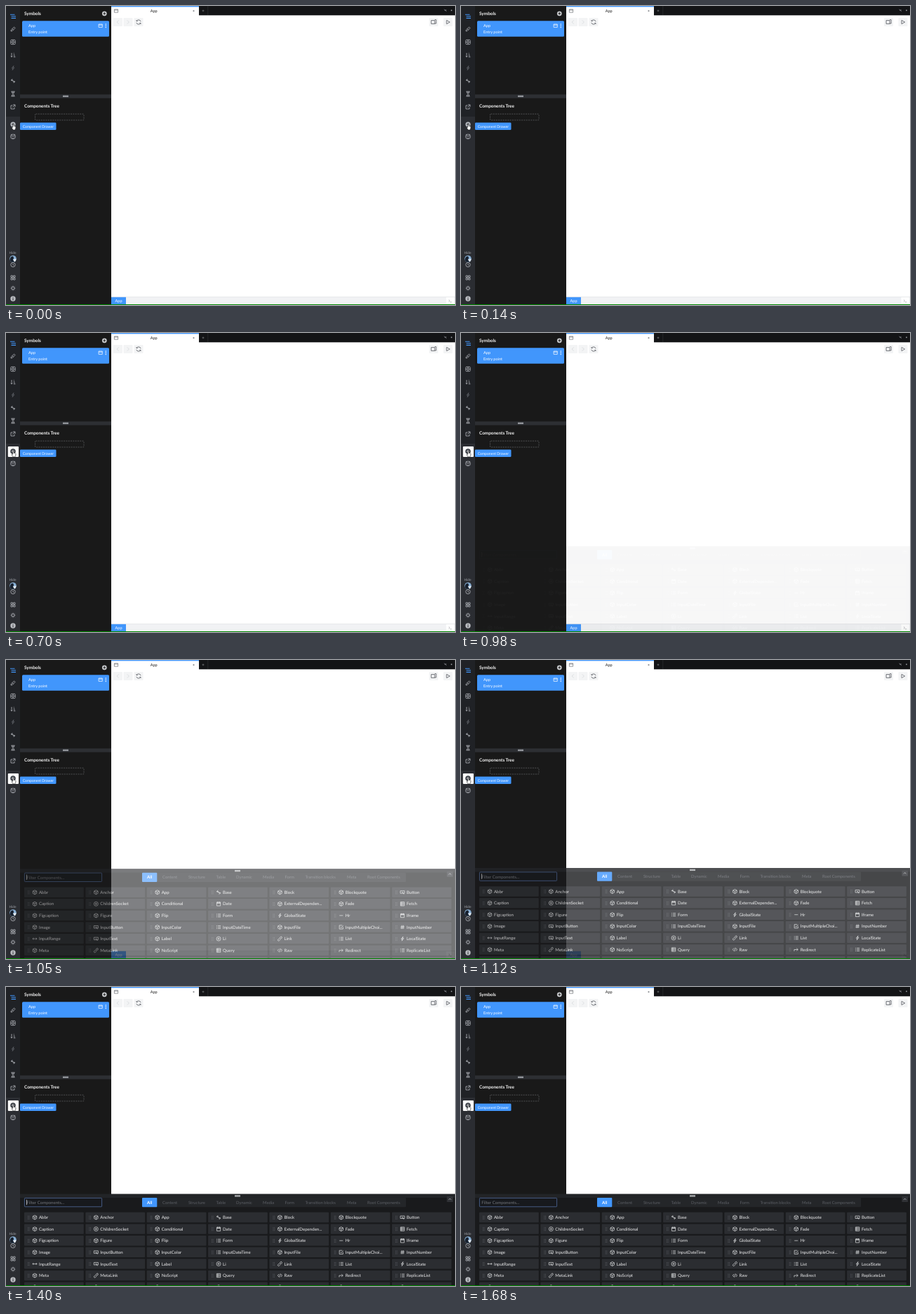
These frames come from a looping animation (640 px wide and 427 px high, 1.82 s). An HTML page:

```html
<!DOCTYPE html>
<html lang="en">
<head>
<meta charset="utf-8">
<title>Component drawer</title>
<style>
  html, body { margin: 0; width: 100%; height: 100%; overflow: hidden; background: #191919; }
  svg { display: block; }
  text { font-family: Lato, sans-serif; text-rendering: geometricPrecision; }
</style>
</head>
<body>
<svg id="stage" width="640" height="427" viewBox="0 0 640 427"></svg>
<script>
const BLUE = '#4196fc';
const LOOP = 1820, STEP = 70;

// Icons are drawn around 0,0 in a box of about 8 units.
const ICONS = {
  cube: 'M0-3L2.7-1.6V1.6L0 3L-2.7 1.6V-1.6ZM-2.7-1.6L0-.2L2.7-1.6M0-.2V3',
  dot: 'M-3 0a3 3 0 1 0 6 0a3 3 0 1 0-6 0M-1 0a1 1 0 1 0 2 0a1 1 0 1 0-2 0M-.4 0H.4',
  swap: 'M-.7-3L-2.7-1L2.7 1L.7 3M-2.7-1L0-1M2.7 1H0',
  button: 'M-3-2H3V1.5H-3ZM-1 0H1M.5.3L2 2.8',
  calendar: 'M-2.6-2.4H2.6V2.8H-2.6ZM-2.6-1.4H2.6M-2.6-1H2.6M-1.3-3.2V-2M1.3-3.2V-2',
  rows: 'M-2.7-2.7H2.7V2.7H-2.7ZM-2.7-1H2.7M-2.7.8H2.7M-1-2.7V2.7',
  lines: 'M-3-2H-2M-1-2H3M-3 0H-2M-1 0H3M-3 2H-2M-1 2H3',
  bolt: 'M.9-3L-1.8.4H0L-.9 3L1.8-.5H0Z',
  minus: 'M-2.5 0H2.5',
  check: 'M2.6 0V2.6H-2.6V-2.6H1.5M-1.3-.3L0 1L2.8-2.2',
  hash: 'M-.7-2.7L-1.4 2.7M1.4-2.7L.7 2.7M-2.5-1H2.7M-2.7 1H2.5',
  range: 'M-3 0H3M-1.8-1.4L-3 0L-1.8 1.4M1.8-1.4L3 0L1.8 1.4',
  link: 'M-.5.5L1.2-1.2M-1-.6L-2.6 1a1.2 1.2 0 0 0 1.7 1.7L.6 1.1M1 .6L2.6-1A1.2 1.2 0 0 0 .9-2.7L-.6-1.1',
  code: 'M-1.5-2L-3 0L-1.5 2M1.5-2L3 0L1.5 2M.7-2.7L-.7 2.7',
  arrow: 'M-2.8 2.4V0H2.4M.6-1.8L2.5 0L.6 1.8',
  brush: 'M-3 3L-2.5.9L1.6-3L3-1.5L-.9 2.5ZM-1.2-.3L.4 1.3',
  target: 'M-3.2-2Q-3.2-3.2-2-3.2H2Q3.2-3.2 3.2-2V2Q3.2 3.2 2 3.2H-2Q-3.2 3.2-3.2 2ZM-1.3 0a1.3 1.3 0 1 0 2.6 0a1.3 1.3 0 1 0-2.6 0M0-3.2V-1.3M0 1.3V3.2M-3.2 0H-1.3M1.3 0H3.2',
  sort: 'M-2-3V3M-3.2 1.7L-2 3L-.8 1.7M.8-2.6H1.6M.8-.7H2.2M.8 1H2.8M.8 2.8H3.4',
  hourglass: 'M-2.6-3.4H2.6M-2.6 3.4H2.6M-1.8-3.4Q-1.8-1 0 0Q1.8 1 1.8 3.4M1.8-3.4Q1.8-1 0 0Q-1.8 1-1.8 3.4M-1 2.5H1M-1-2.2H1',
  external: 'M-.5-2H-3V3H2V.6M0-3H3V0M3-3L-.6.6',
  head: 'M-3.4 0a3.4 3.4 0 1 0 6.8 0a3.4 3.4 0 1 0-6.8 0M-2.6-.8H2.6M-1.6.7V1M1.6.7V1M-1 2.3H1M-2-2.8L-3-3.3M2-2.8L3-3.3',
  clock: 'M-3.2 0a3.2 3.2 0 1 0 6.4 0a3.2 3.2 0 1 0-6.4 0M0-1.8V.2L1.3 1',
  grid: 'M-3-3H-.6V-.6H-3ZM.6-3H3V-.6H.6ZM-3 .6H-.6V3H-3ZM.6.6H3V3H.6Z',
  gear: 'M-2 0a2 2 0 1 0 4 0a2 2 0 1 0-4 0M0-3.4V-2M0 2V3.4M-3.4 0H-2M2 0H3.4M-2.4-2.4L-1.4-1.4M2.4 2.4L1.4 1.4M-2.4 2.4L-1.4 1.4M2.4-2.4L1.4-1.4',
  plus: 'M-1.8 0H1.8M0-1.8V1.8',
  left: 'M1.2-2.6L-1.4 0L1.2 2.6',
  right: 'M-1.2-2.6L1.4 0L-1.2 2.6',
  reload: 'M-2.7-1.6A3.2 3.2 0 0 1 3.1-.8M2.7 1.6A3.2 3.2 0 0 1-3.1.8M-3-3V-1.4H-1.4M3 3V1.4H1.4',
  devices: 'M-3.4-2.4H1.6V2.4H-3.4ZM1.6-3.4H3.6V2H1.6',
  play: 'M-2-2.6L2.7 0L-2 2.6Z',
  window: 'M-2.6-2.2H2.6V2.2H-2.6ZM-2.6-1.1H2.6',
  up: 'M-1.7.8L0-.9L1.7.8',
  prompt: 'M-2-1.5L-.4 0L-2 1.5M0 1.8H2.2',
};

const COMPONENTS = `Abbr Anchor App Base:swap Block Blockquote Button:button
Caption ChildrenSocket:dot Conditional Date:calendar ExternalDependen... Fade Fetch:rows
Figcaption Figure Flip Form:lines GlobalState:bolt Hr:minus Iframe:calendar
Image InputButton:button InputColor InputDateTime:lines InputFile InputMultipleChoi...:check InputNumber:hash
InputRange:range InputText:button Label Li:dot Link:link List:lines LocalState:bolt
Meta MetaLink:link NoScript Query:rows Raw:code Redirect:arrow ReplicateList:lines
: : : : : : :`.split(/\s+/);

const CATEGORIES = [['Content', 223], ['Structure', 260], ['Table', 299.5], ['Dynamic', 328], ['Media', 366],
  ['Form', 397.5], ['Transition blocks', 426.5], ['Meta', 486], ['Root Components', 515]];

const rect = (x, y, w, h, fill, extra = '') =>
  `<rect x="${x}" y="${y}" width="${w}" height="${h}" fill="${fill}" ${extra}/>`;
const text = (x, y, label, size, fill, extra = '') =>
  `<text x="${x}" y="${y}" font-size="${size}" fill="${fill}" ${extra}>${label}</text>`;
const circle = (x, y, r, fill) => `<circle cx="${x}" cy="${y}" r="${r}" fill="${fill}"/>`;
const icon = (name, x, y, color, width = .7, scale = 1) =>
  `<path d="${ICONS[name]}" transform="translate(${x} ${y}) scale(${scale})" fill="none" stroke="${color}" stroke-width="${width}"/>`;
const badge = (x, y, r, fill, mark) => circle(x, y, r, fill) + icon('plus', x, y, mark, .9);

function sidebar() {
  const tools = [['brush', 33], ['target', 51.5], ['sort', 70], ['swap', 107], ['hourglass', 125.5],
    ['external', 144], ['head', 186.5], ['clock', 369.5], ['grid', 388], ['gear', 403]];
  return rect(0, 0, 20, 158, '#202226') + rect(0, 158, 20, 268, '#2b2d32') +
    `<path d="M6 12.2H12.5M7.5 14.8H14M7.5 17.4H14" stroke="${BLUE}" stroke-width="1.1"/>` +
    tools.map(([name, y]) => icon(name, 10, y, '#b4b7bd', .8)).join('') +
    icon('bolt', 10, 88.5, '#686b72') +
    text(9.5, 353.8, 'Hide', 4.8, '#a0a3a9', 'text-anchor="middle"') +
    circle(10, 361, 4.8, '#87aed3') +
    '<path d="M5.6 363Q6 357 10 357.5Q12 360 10 362L12 365.4Q7 366.6 5.6 363" fill="#17202d"/>' +
    '<path d="M10 362L14.4 361Q14.5 364.5 12 365.3Z" fill="#e7edf3"/>' +
    circle(10, 418, 3.7, '#b9bbc0') +
    '<path d="M10 415.7V416.6M10 417.3V420.3" stroke="#2b2d32" stroke-width="1"/>';
}

function symbolsPanel() {
  return rect(20, 0, 130, 426, '#191919') +
    text(26, 13.2, 'Symbols', 6.45, '#f3f3f3', 'font-weight="700"') +
    badge(140.3, 10.8, 3.4, '#c7c9cc', '#191919') +
    rect(23, 21.3, 124, 22.5, BLUE, 'rx="1.5"') +
    text(32, 30.3, 'App', 5.6, '#fff') + text(32, 39.2, 'Entry point', 5.55, '#fff') +
    icon('window', 134.7, 28.2, '#fff') +
    [26, 28.3, 30.6].map(y => circle(142.3, y, .75, '#fff')).join('') +
    rect(20, 126.3, 130, 5.3, '#2d2f33') + rect(81, 127.7, 8, 2.4, '#92959a') +
    text(26, 145.2, 'Components Tree', 6.4, '#f3f3f3', 'font-weight="700"') +
    rect(41.5, 154.2, 69.5, 8.8, 'none', 'rx="1" stroke="#66686b" stroke-width=".7" stroke-dasharray="2 1.3"');
}

function editor() {
  return rect(150, 0, 490, 426, '#fff') + rect(275, 0, 365, 13.3, '#131416') +
    rect(150, 0, 125, 1.3, BLUE) + rect(287.5, 0, .7, 13, '#2d2f32') +
    icon('window', 157, 7, '#55585d', .6) +
    text(205.7, 9, 'App', 5.6, '#222') + circle(267.5, 7, 1.1, '#85888d') +
    icon('plus', 281, 6.8, '#8d9095', .7, .8) +
    '<path d="M624.5 4.8L628 7.5M625.5 7L627.5 5" stroke="#8d9095" stroke-width=".8"/>' +
    circle(635, 6.3, 1, '#85888d') +
    [153, 167.5, 182.5, 603, 623.5].map(x => rect(x, 17, 13, 12, '#f3f4f5', 'rx="1"')).join('') +
    icon('left', 159.5, 23, '#d2d5d9') + icon('right', 174, 23, '#d2d5d9') +
    icon('reload', 189, 23, '#51555b', .8) +
    icon('devices', 609.5, 23, '#51555b', .8) + icon('play', 630, 23, '#51555b', .8) +
    rect(150, 415.5, 490, 10.5, '#f1f2f4') + rect(150, 415.3, 490, .6, '#dddfe2') +
    rect(150, 415.8, 21, 10.2, BLUE) + text(155.5, 423, 'App', 5.6, '#fff') +
    rect(627.5, 416, 11.5, 9.5, '#fff') + icon('prompt', 633, 421, '#8a8d92', .6);
}

function componentCard(entry, index) {
  const [label, name = 'cube'] = entry.split(':');
  const x = 26 + index % 7 * 87.35, y = 329 + Math.floor(index / 7) * 16.6;
  const grip = `<path d="M${x + 5.5} ${y - 2.2}v5M${x + 7.2} ${y - 2.2}v5" stroke="#6b6e74" stroke-width=".8" stroke-dasharray=".8 1.2"/>`;
  return rect(x, y - 7.2, 84.8, 14.4, '#2b2d31', 'rx="1"') + grip +
    icon(name || 'cube', x + 15, y, '#e0e1e3') + text(x + 21, y + 2.1, label, 6.1, '#ededee');
}

function drawer() {
  return rect(20, 296, 620, 142, '#191a1c') + rect(20, 295.5, 620, 5.5, '#222427') +
    rect(326, 297.2, 8, 2.4, '#a5a7aa') +
    rect(26.4, 301.4, 110.2, 12.4, '#17191d', 'rx=".8" stroke="#4b628f" stroke-width=".9"') +
    text(29.3, 310, 'Filter Components...', 6.1, '#74777d') +
    rect(29, 303.8, .7, 7.4, '#e7e7e7', 'id="caret"') +
    rect(194, 301, 376, 13.2, '#242629', 'rx="1"') + rect(194, 301, 21.3, 13.2, BLUE, 'rx="1"') +
    text(204.6, 309.8, 'All', 6, '#fff', 'text-anchor="middle" font-weight="700"') +
    CATEGORIES.map(([label, x]) => text(x, 309.8, label, 5.9, '#5c5f65')).join('') +
    rect(628.5, 299, 8.5, 8, '#303236') + icon('up', 632.7, 303, '#c2c4c7', .8) +
    COMPONENTS.map(componentCard).join('');
}

function pointerArea() {
  return `<g id="active">${rect(2.8, 162, 15.2, 15, '#fff', 'rx="1"')}</g>` +
    `<g id="idleBadge">${badge(10, 169, 3.6, '#b4b7bd', '#2b2d32')}</g>` +
    `<g id="activeBadge">${badge(10, 169, 3.8, '#40444b', '#fff')}</g>` +
    rect(20, 166.5, 51.5, 10.5, BLUE, 'rx="1.3"') +
    text(23.7, 173.6, 'Component Drawer', 5.1, '#fff') +
    '<path d="M10 168.7Q11 168 11.3 169V171.3Q13.7 171.3 14 172.8Q14 175.8 12.7 177H10.2L8.2 174Q8 172.7 9.7 173.2Z" fill="#fff" stroke="#17181a" stroke-width=".6"/>';
}

document.getElementById('stage').innerHTML =
  sidebar() + symbolsPanel() + editor() + `<g id="drawer">${drawer()}</g>` +
  pointerArea() + rect(0, 426, 640, 1, '#008700');

const part = id => document.getElementById(id);
const [drawerPart, caret, active, idleBadge, activeBadge] =
  ['drawer', 'caret', 'active', 'idleBadge', 'activeBadge'].map(part);
const show = (element, visible) => element.setAttribute('visibility', visible ? 'visible' : 'hidden');

// Opacity and downward offset of the opening drawer, one pair per step.
const OPENING = [[.03, 9], [.6, 2.7], [.8, 1.5], [1, 0]];
const OPEN_AT = 980;

function render(now) {
  const time = now % LOOP;
  const step = Math.floor((time - OPEN_AT) / STEP);
  const [opacity, offset] = step < 0 ? [0, 0] : OPENING[Math.min(step, OPENING.length - 1)];
  drawerPart.setAttribute('opacity', opacity);
  drawerPart.setAttribute('transform', `translate(0 ${offset})`);
  show(caret, time < 1540);
  const pressed = time >= 560;
  show(active, pressed);
  show(activeBadge, pressed);
  show(idleBadge, !pressed);
}

const start = performance.now();
function tick() {
  render(performance.now() - start);
  requestAnimationFrame(tick);
}
tick();
</script>
</body>
</html>
```
